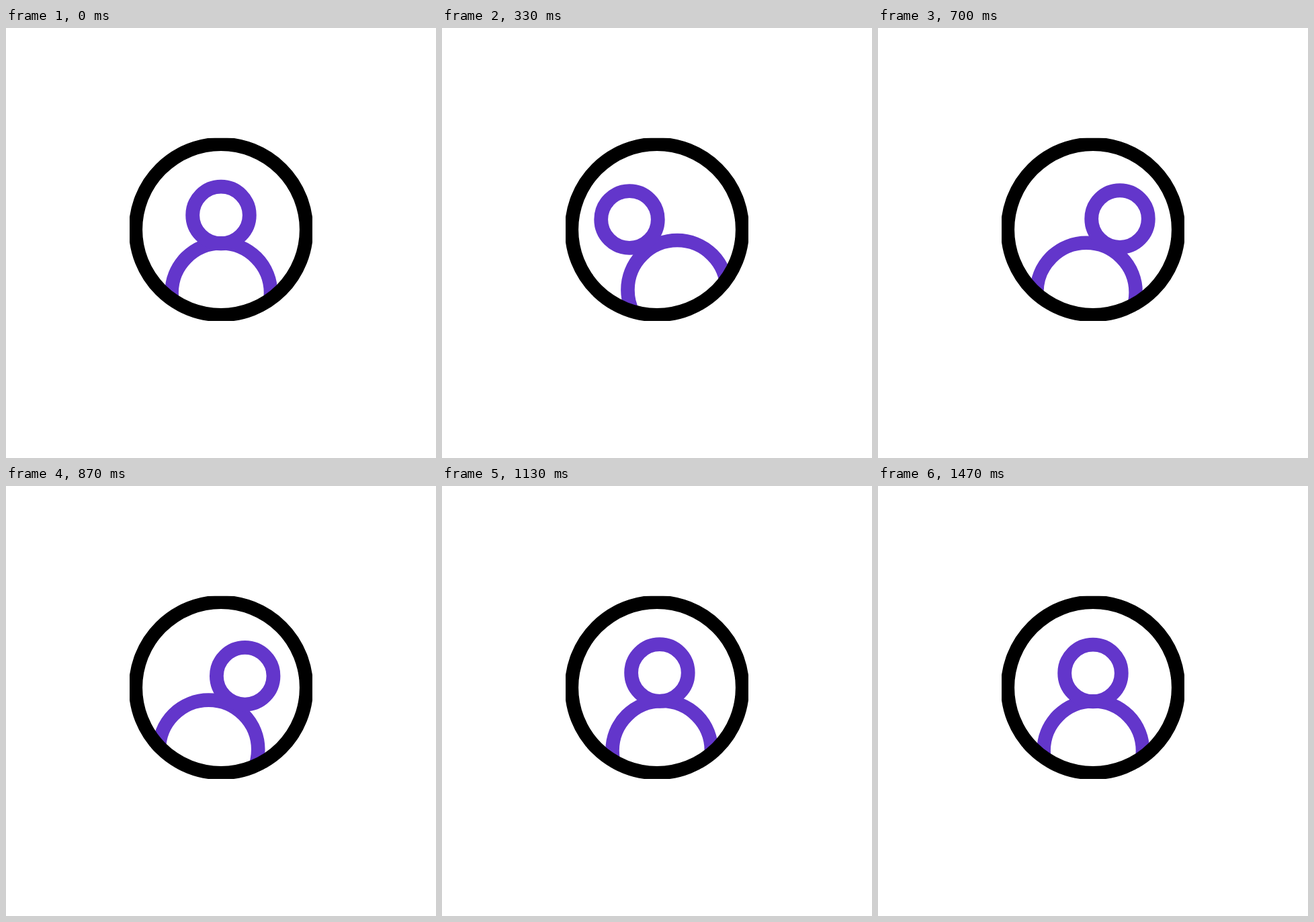
These frames come from a looping animation (640 by 640 pixels, 1.67 s). An HTML page:

```html
<!DOCTYPE html>
<html lang="en">
<head>
<meta charset="utf-8">
<title>Profile icon</title>
<style>
  html, body { margin: 0; width: 100%; height: 100%; overflow: hidden; background: #fff; }
  svg { display: block; width: 100vw; height: 100vh; }
</style>
</head>
<body>
<svg viewBox="0 0 640 640">
  <clipPath id="inside"><circle cx="320" cy="300" r="119"/></clipPath>
  <clipPath id="box"><rect x="184" y="163.7" width="272" height="272.3"/></clipPath>
  <g clip-path="url(#inside)" fill="none" stroke="#6336cb">
    <circle id="body" r="73.7" stroke-width="20.6"/>
    <circle id="head" r="42.3" stroke-width="20.8"/>
  </g>
  <g clip-path="url(#box)">
    <circle cx="320" cy="300" r="127.1" fill="none" stroke="#000" stroke-width="20.4"/>
  </g>
</svg>
<script>
  const LOOP = 1670, LAST = 44;
  const head = document.getElementById('head');
  const body = document.getElementById('body');

  // Keys: [step, x offset, y offset, lift of the arc leading here]
  const headKeys = [[0, 0, 0, 0], [11.5, -43, 7.5, 3.6], [22.2, 43, 7.5, 14.5], [36.7, 0, 0, 3.5], [LAST, 0, 0, 0]];
  const bodyKeys = [[0, 0], [13, 34.5], [15.4, 34.5], [23.5, -23.5], [33.5, 7], [LAST, 0]];

  const mix = (a, b, s) => a + (b - a) * s;

  function segment(keys, t) {
    const n = Math.max(1, keys.findIndex(k => k[0] >= t));
    const a = keys[n - 1], b = keys[n];
    const u = (t - a[0]) / (b[0] - a[0]);
    return { a, b, s: u * u * (3 - 2 * u) };
  }

  function place(el, x, y) {
    el.setAttribute('cx', x.toFixed(2));
    el.setAttribute('cy', y.toFixed(2));
  }

  function draw(ms) {
    // The motion advances at 30 steps per second
    const t = Math.min(LAST, Math.floor(ms * 0.03 + 0.11));

    const h = segment(headKeys, t);
    const lift = 4 * h.s * (1 - h.s) * h.b[3];
    place(head, 320 + mix(h.a[1], h.b[1], h.s), 278.5 + mix(h.a[2], h.b[2], h.s) - lift);

    const b = segment(bodyKeys, t);
    const dx = mix(b.a[1], b.b[1], b.s);
    place(body, 320.3 + dx, 394 - 0.0048 * dx * dx);
  }

  const start = performance.now();
  function tick() {
    draw((performance.now() - start) % LOOP);
    requestAnimationFrame(tick);
  }
  tick();
</script>
</body>
</html>
```
